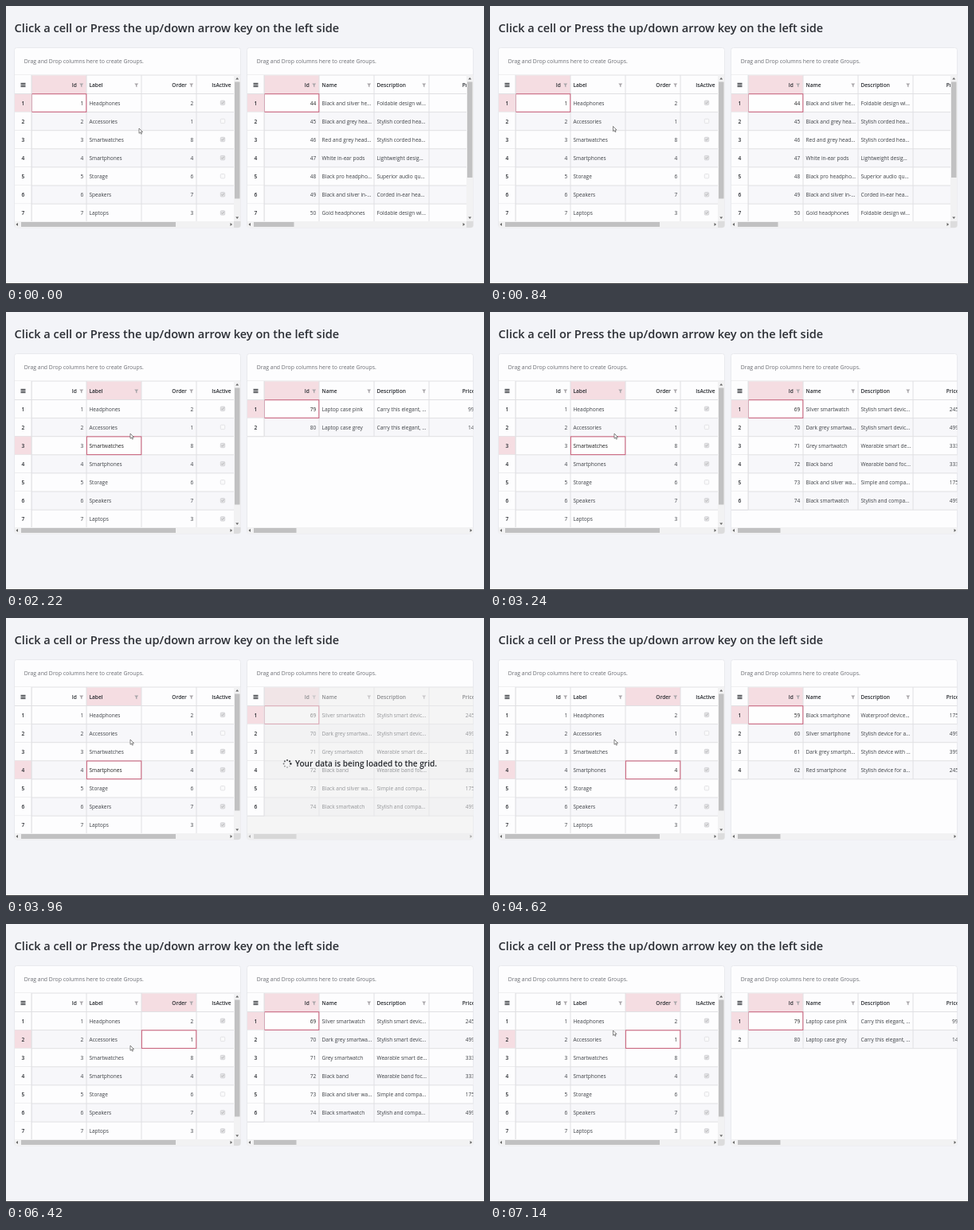
An HTML page with a canvas that plays this animation: 600x350 px, repeating every 7.2 s.

```html
<!DOCTYPE html>
<html>
<head>
<meta charset="utf-8">
<style>
  html, body { margin: 0; width: 100%; height: 100%; overflow: hidden; background: #f3f4f8; }
  canvas { display: block; }
</style>
</head>
<body>
<canvas id="stage" width="600" height="350"></canvas>
<script>
const ctx = document.getElementById('stage').getContext('2d');
const LOOP = 7200, TOP = 87, BODY = 110.5, ROW = 23.1, CELL = 69;
const FONT = '"Open Sans", "Noto Sans", sans-serif';
const PINK = '#f5dde2', ACCENT = '#cb6780', LINE = '#e0e0e3', INK = '#3d4045', DARK = '#25282d';

const categories = [
  ['Headphones', 2, 1], ['Accessories', 1, 0], ['Smartwatches', 8, 1], ['Smartphones', 4, 1],
  ['Storage', 6, 0], ['Speakers', 7, 1], ['Laptops', 3, 1]
].map(([label, order, active], i) => ({ cells: [i + 1, label, order], active }));

const makeProducts = (firstId, rows) => rows.map(([name, about, price = ''], i) =>
  ({ cells: [firstId + i, name, about], price }));

const products = {
  1: makeProducts(44, [
    ['Black and silver he...', 'Foldable design wi...'],
    ['Black and grey hea...', 'Stylish corded hea...'],
    ['Red and grey head...', 'Stylish corded hea...'],
    ['White in-ear pods', 'Lightweight desig...'],
    ['Black pro headpho...', 'Superior audio qu...'],
    ['Black and silver in-...', 'Corded in-ear hea...'],
    ['Gold headphones', 'Foldable design wi...']]),
  2: makeProducts(79, [
    ['Laptop case pink', 'Carry this elegant, ...', '99'],
    ['Laptop case grey', 'Carry this elegant, ...', '14']]),
  3: makeProducts(69, [
    ['Silver smartwatch', 'Stylish smart devic...', '245'],
    ['Dark grey smartwa...', 'Stylish smart devic...', '499'],
    ['Grey smartwatch', 'Wearable smart de...', '333'],
    ['Black band', 'Wearable band foc...', '333'],
    ['Black and silver wa...', 'Simple and compa...', '175'],
    ['Black smartwatch', 'Stylish and compa...', '499']]),
  4: makeProducts(59, [
    ['Black smartphone', 'Waterproof device...', '175'],
    ['Silver smartphone', 'Stylish device for a...', '499'],
    ['Dark grey smartph...', 'Stylish device with ...', '399'],
    ['Red smartphone', 'Stylish device for a...', '245']])
};

// [time, value] steps
const rowSteps = [[0, 1], [1020, 2], [2160, 3], [3600, 4], [5280, 3], [6360, 2]];
const columnSteps = [[0, 0], [1020, 1], [4260, 2]];
const dataSteps = [[0, 1], [1800, 2], [2940, 3], [4380, 4], [6060, 3], [7140, 2]];
const loadings = [[1200, 1800], [2400, 2940], [3780, 4380], [5520, 6060], [6480, 7080]];
const cursorPath = [[0, 167, 154], [120, 167, 154], [780, 154.5, 151.5], [1500, 154.5, 151.5],
  [1800, 156, 153], [6900, 156, 153], [7140, 154.5, 134]];

const valueAt = (steps, t) => steps.filter(s => s[0] <= t).pop()[1];

function cursorAt(t) {
  const i = cursorPath.findIndex(p => p[0] > t);
  if (i < 0) return cursorPath[cursorPath.length - 1].slice(1);
  const [t0, x0, y0] = cursorPath[i - 1], [t1, x1, y1] = cursorPath[i];
  const u = (t - t0) / (t1 - t0), k = u * u * (3 - 2 * u);
  return [x0 + (x1 - x0) * k, y0 + (y1 - y0) * k];
}

function rect(x, y, w, h, color) {
  ctx.fillStyle = color;
  ctx.fillRect(x, y, w, h);
}

function line(x0, y0, x1, y1, color = LINE, width = 1) {
  ctx.strokeStyle = color;
  ctx.lineWidth = width;
  ctx.beginPath();
  ctx.moveTo(x0, y0);
  ctx.lineTo(x1, y1);
  ctx.stroke();
}

function polygon(points, color) {
  ctx.fillStyle = color;
  ctx.beginPath();
  points.forEach(([x, y]) => ctx.lineTo(x, y));
  ctx.closePath();
  ctx.fill();
}

function text(str, x, y, { size = 6.55, weight = 400, align = 'left', color = INK } = {}) {
  ctx.font = `${weight} ${size}px ${FONT}`;
  ctx.textAlign = align;
  ctx.fillStyle = color;
  ctx.fillText(str, x, y + size * 0.36);
}

const funnel = (x, y) => polygon([[x - 2.5, y - 2.3], [x + 2.5, y - 2.3], [x + .7, y],
  [x + .7, y + 2.6], [x - .7, y + 1.8], [x - .7, y]], '#a9a6aa');

function arrow(x, y, dx, dy) {
  polygon([[x + dx * 1.6, y + dy * 1.6], [x - dx - dy * 2, y - dy - dx * 2],
    [x - dx + dy * 2, y - dy + dx * 2]], '#666');
}

function checkbox(x, y, checked) {
  ctx.fillStyle = checked ? '#e2e2e4' : '#fafafb';
  ctx.strokeStyle = checked ? '#cfcfd2' : '#dedde0';
  ctx.lineWidth = .8;
  ctx.beginPath();
  ctx.roundRect(x - 2.7, y - 2.7, 5.4, 5.4, 1);
  ctx.fill();
  ctx.stroke();
  if (checked) {
    line(x - 1.5, y, x - .4, y + 1.2, '#aaaaad', .8);
    line(x - .4, y + 1.2, x + 1.7, y - 1.4, '#aaaaad', .8);
  }
}

function drawRowHeaders(x, count, selectedRow) {
  rect(x + 1, TOP, 21, BODY - TOP, '#fdfdfe');
  for (let i = -1; i <= 1; i++) rect(x + 8.5, 99 + i * 2 - .1, 6, 1.1, DARK);
  for (let i = 0; i < count; i++) {
    const y = BODY + i * ROW;
    rect(x + 1, y, 21, ROW, i + 1 === selectedRow ? PINK : '#fdfdfe');
    text(i + 1, x + 11.3, y + 11.9, { weight: 600, align: 'center', color: DARK });
    line(x + 1, y + ROW, x + 22, y + ROW);
  }
  line(x + 1, BODY, x + 22, BODY);
  line(x + 22, TOP, x + 22, BODY + count * ROW);
}

function drawScrollbars(x, vertical, thumbEnd, verticalEnd) {
  const right = x + 284.5 - (vertical ? 9 : 0);
  rect(x + 1, 271, 284, 8, '#f2f2f3');
  rect(x + 9, 272, thumbEnd - 9, 6, '#c1c1c2');
  arrow(x + 4, 275, -1, 0);
  arrow(right - 3, 275, 1, 0);
  if (!vertical) return;
  rect(x + 276, TOP, 9, 184, '#f2f2f3');
  rect(x + 276, 271, 9, 8, '#dcdcdd');
  rect(x + 277, 95.5, 6.5, verticalEnd - 95.5, '#c1c1c2');
  arrow(x + 280.2, 91.5, 0, -1);
  arrow(x + 280.2, 266.5, 0, 1);
}

function drawGrid(x, titles, numeric, rows, row, column, scroll, last, loadingTime) {
  const isLoading = loadingTime !== undefined;
  const left = c => x + 22 + c * CELL;
  const header = { weight: 600, color: DARK };

  ctx.save();
  ctx.beginPath();
  ctx.roundRect(x + .5, 52.5, 284, 226.5, 3);
  ctx.fillStyle = '#fdfdfe';
  ctx.fill();
  ctx.strokeStyle = '#e9eaee';
  ctx.lineWidth = 1;
  ctx.stroke();
  ctx.clip();
  text('Drag and Drop columns here to create Groups.', x + 12.7, 70, { size: 6.9, color: '#6b6d73' });
  line(x, TOP, x + 285, TOP);

  ctx.save();
  ctx.beginPath();
  ctx.rect(x + 1, TOP, scroll.vertical ? 275 : 284, 184);
  ctx.clip();
  rect(left(column), TOP + .5, CELL, BODY - TOP, PINK);
  rows.forEach((r, i) => { if (i % 2) rect(x + 22, BODY + i * ROW, 264, ROW, '#f7f7fa'); });
  for (let c = 0; c < 4; c++) line(left(c), TOP, left(c), BODY + rows.length * ROW);
  for (let i = 0; i <= rows.length; i++) line(x + 1, BODY + i * ROW, x + 285, BODY + i * ROW);
  titles.forEach((title, c) => {
    if (numeric[c]) text(title, left(c) + 56.8, 99.7, { ...header, align: 'right' });
    else text(title, left(c) + 3.5, 99.7, header);
    funnel(left(c) + 62.7, 99.7);
  });
  text(last.title, last.x, 99.7, header);

  const cellTop = BODY + (row - 1) * ROW;
  rect(left(column) + .5, cellTop + .5, CELL - 1, ROW - 1, '#fefefe');
  rows.forEach((r, i) => {
    const y = BODY + i * ROW + 12;
    r.cells.forEach((cell, c) => {
      const color = i + 1 === row && c === column ? '#222' : INK;
      if (numeric[c]) text(cell, left(c) + 65.3, y, { align: 'right', color });
      else text(cell, left(c) + 3.5, y, { color });
    });
    last.draw(r, y);
  });
  ctx.strokeStyle = ACCENT;
  ctx.lineWidth = 1.1;
  ctx.strokeRect(left(column) + .4, cellTop + .2, CELL - .6, ROW - .4);
  ctx.restore();

  drawScrollbars(x, scroll.vertical, scroll.end, scroll.verticalEnd);
  if (isLoading) rect(x + 1, TOP, 284, 192, 'rgba(238,237,238,.5)');

  // The frozen row-header column stays above the loading veil.
  ctx.save();
  ctx.beginPath();
  ctx.rect(x, TOP, 30, 184);
  ctx.clip();
  drawRowHeaders(x, rows.length, row);
  ctx.restore();
  if (isLoading) drawLoading(loadingTime);
  ctx.restore();
}

function drawLoading(t) {
  const step = Math.floor(t / 100) % 8;
  for (let i = 0; i < 8; i++) {
    const a = i * Math.PI / 4, fade = ((i - step + 8) % 8) / 7;
    ctx.fillStyle = `rgba(35,38,43,${.3 + .7 * fade})`;
    ctx.beginPath();
    ctx.arc(353 + 4.4 * Math.cos(a), 183.5 + 4.4 * Math.sin(a), .8 + .4 * fade, 0, 7);
    ctx.fill();
  }
  text('Your data is being loaded to the grid.', 363, 183.6, { size: 10.05, weight: 600, color: DARK });
}

function drawCursor(x, y) {
  const shape = [[0, 0], [0, 6.3], [1.5, 5], [2.5, 7.2], [3.5, 6.8], [2.6, 4.6], [4.5, 4.5]]
    .map(([dx, dy]) => [x + dx, y + dy]);
  polygon(shape, '#fff');
  ctx.strokeStyle = '#555';
  ctx.lineWidth = .7;
  ctx.stroke();
}

const activeColumn = { title: 'IsActive', x: 258.2, draw: (r, y) => checkbox(272, y - .7, r.active) };
const priceColumn = { title: 'Price', x: 572.8,
  draw: (r, y) => text(r.price, r.price.length > 2 ? 576.8 : 580, y) };

function draw(now) {
  const t = now % LOOP;
  const row = valueAt(rowSteps, t), category = valueAt(dataSteps, t);
  const loading = loadings.find(([a, b]) => t >= a && t < b);
  const long = category === 1;

  rect(0, 0, 600, 350, '#f3f4f8');
  rect(0, 349, 600, 1, '#3b3c3f');
  text('Click a cell or Press the up/down arrow key on the left side', 10.6, 28.2,
    { size: 14.55, weight: 600, color: '#2b2e34' });
  drawGrid(10, ['Id', 'Label', 'Order'], [1, 0, 1], categories, row, valueAt(columnSteps, t),
    { vertical: true, end: 203, verticalEnd: 242.5 }, activeColumn);
  drawGrid(302, ['Id', 'Name', 'Description'], [1, 0, 0], products[category], 1, 0,
    { vertical: long, end: long ? 59.5 : 62.5, verticalEnd: 216 }, priceColumn,
    loading && t - loading[0]);
  drawCursor(...cursorAt(t));
}

const start = performance.now();
function tick() {
  draw(performance.now() - start);
  requestAnimationFrame(tick);
}
tick();
</script>
</body>
</html>
```
